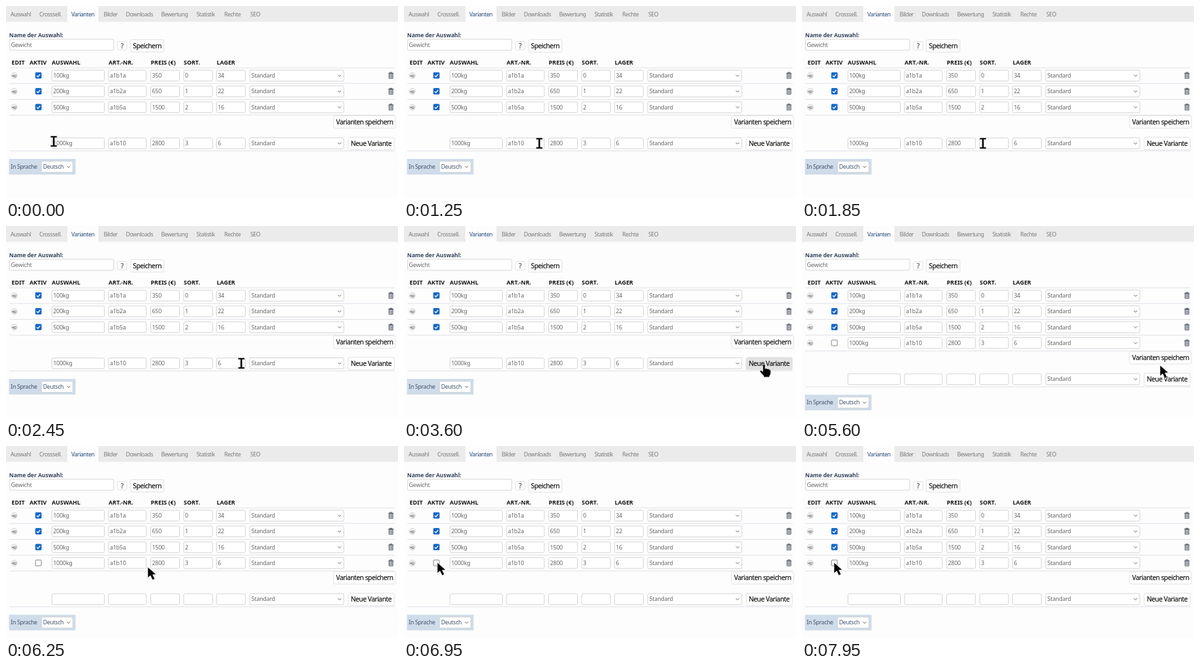
An HTML page that plays this animation: 600x295 px, repeating every 8 s.

```html
<!DOCTYPE html>
<html lang="de">
<head>
<meta charset="utf-8">
<title>Varianten</title>
<style>
  html, body { margin: 0; width: 100%; height: 100%; overflow: hidden; background: #fdfdfe; }
  svg { display: block; width: 600px; height: 295px; font-family: "Noto Sans", "Open Sans", sans-serif; }
  text { white-space: pre; }
  .tab { font-size: 8.7px; letter-spacing: -.45px; fill: #7b7b7b; }
  .on { fill: #244a78; }
  .val { font-size: 8.9px; letter-spacing: -.2px; fill: #666; }
  .head { font-size: 8.9px; font-weight: 700; fill: #161616; }
  .name { font-size: 8.6px; font-weight: 700; letter-spacing: -.05px; fill: #35435a; }
  .help { font-size: 10px; fill: #555; stroke: #555; stroke-width: .25; }
  .lang { font-size: 8.7px; letter-spacing: -.3px; fill: #42536a; }
  .btn { font-size: 10.2px; letter-spacing: -.44px; fill: #111; stroke: #111; stroke-width: .15; }
  .box { fill: #fff; stroke: #d0d0d0; stroke-width: .9; }
  .face { fill: #fff; stroke: #dedede; stroke-width: .9; }
  .hover { fill: #e1e1e1; }
</style>
</head>
<body>
<svg id="stage" viewBox="0 0 600 295"></svg>
<script>
const LOOP = 8000, ADDED = 3950, PITCH = 24.3;
const stage = document.getElementById('stage');

function el(parent, tag, attrs = {}, content) {
  const node = document.createElementNS('http://www.w3.org/2000/svg', tag);
  for (const key in attrs) node.setAttribute(key, attrs[key]);
  if (content) node.textContent = content;
  parent.append(node);
  return node;
}
const group = parent => el(parent, 'g');
const rect = (p, x, y, width, height, attrs) => el(p, 'rect', { x, y, width, height, ...attrs });
const label = (p, x, y, str, cls) => el(p, 'text', { x, y, class: cls }, str);
const path = (p, d, attrs) => el(p, 'path', { d, fill: 'none', ...attrs });
const rule = (p, y) => rect(p, 5, y, 590, 1, { fill: '#e0e2e7' });

function field(p, x, mid, w, str, h = 16.5) {
  rect(p, x, mid - h / 2, w, h, { rx: 2, class: 'box' });
  return label(p, x + 1.9, mid + 3.1, str, 'val');
}
function select(p, x, mid, w, str, cls = 'val') {
  rect(p, x, mid - 8.5, w, 17, { rx: 2, class: 'box' });
  label(p, x + 2.5, mid + 3.1, str, cls);
  path(p, `M${x + w - 9} ${mid - 1.2}l2.5 2.5 2.5-2.5`, { stroke: '#666', 'stroke-width': 1 });
}
function button(p, x, mid, w, str) {
  const face = rect(p, x, mid - 9.5, w, 19, { rx: 2.5, class: 'face' });
  label(p, x + 4, mid + 3.7, str, 'btn');
  return face;
}

const columns = [[70.3, 80.2], [157, 57.6], [221.5, 44], [272, 44], [322.3, 44]];
const items = [
  ['100kg', 'a1b1a', '350', '0', '34'],
  ['200kg', 'a1b2a', '650', '1', '22'],
  ['500kg', 'a1b5a', '1500', '2', '16'],
  ['1000kg', 'a1b10', '2800', '3', '6']
];
const inputs = (p, mid, values) => {
  const texts = columns.map(([x, w], i) => field(p, x, mid, w, values[i]));
  select(p, 373, mid, 144, 'Standard');
  return texts;
};
const rowMid = i => 106.9 + i * PITCH;

function editIcon(p, y) {
  el(p, 'circle', { cx: 12.7, cy: y, r: 4.6, fill: '#f0f0f0', stroke: '#cfcfcf', 'stroke-width': .8 });
  path(p, `M8.2 ${y + .8}q4-3.6 8-1.6l-1 3.4q-3 1-4-.9z`, { fill: '#9a9a9a' });
  el(p, 'circle', { cx: 13.8, cy: y + .4, r: .9, fill: '#f3f3f3' });
}
function checkbox(p, y, on) {
  rect(p, 45.2, y - 4.6, 8.8, 8.8, {
    rx: 1, fill: on ? '#1264c8' : '#fff', stroke: on ? '#1264c8' : '#777', 'stroke-width': .9
  });
  if (on) path(p, `M47 ${y}l1.9 2 3.4-4.2`, { stroke: '#fff', 'stroke-width': 1.3 });
}
function trash(p, y) {
  path(p, `M585.2 ${y - 3.6}h8M587.6 ${y - 3.8}v-1.1h3.2v1.1`, { stroke: '#4d5560', 'stroke-width': 1 });
  path(p, `M586.2 ${y - 2.8}h6v7.2h-6z`, { stroke: '#4d5560', 'stroke-width': .9, fill: '#d3d6da' });
  path(p, `M588 ${y - 1.5}v4.6M590.3 ${y - 1.5}v4.6`, { stroke: '#4d5560', 'stroke-width': .8 });
}
function row(p, i) {
  const y = rowMid(i);
  editIcon(p, y);
  checkbox(p, y, i < 3);
  inputs(p, y, items[i]);
  trash(p, y);
  rule(p, y + 11.7);
}

// Tabs
rect(stage, 0, 0, 600, 24.4, { fill: '#ebebec' });
rect(stage, 94, 0, 47.5, 25, { fill: '#fdfdfe' });
[['Auswahl', 7], ['Crosssell.', 51], ['Varianten', 100], ['Bilder', 149.5], ['Downloads', 183.5],
 ['Bewertung', 237.5], ['Statistik', 291.5], ['Rechte', 334], ['SEO', 374]]
  .forEach(([str, x], i) => label(stage, x, 16, str, i === 2 ? 'tab on' : 'tab'));

// Name
label(stage, 4.8, 48.2, 'Name der Auswahl:', 'name');
field(stage, 5.6, 59.5, 159.4, 'Gewicht', 17);
rect(stage, 170.5, 54.5, 14.5, 13, { rx: 2, class: 'face' });
el(stage, 'text', { x: 177.8, y: 64.8, 'text-anchor': 'middle', class: 'help' }, '?');
button(stage, 190.3, 61.3, 51.5, 'Speichern');

// Table
[['EDIT', 8.5], ['AKTIV', 36], ['AUSWAHL', 70], ['ART.-NR.', 157], ['PREIS (€)', 221.5],
 ['SORT.', 272], ['LAGER', 322.5]].forEach(([str, x]) => label(stage, x, 90.1, str, 'head'));
rule(stage, 94.5);
for (let i = 0; i < 3; i++) row(stage, i);
const added = group(stage);
row(added, 3);

// Everything below the table slides down when a row is added
const tail = group(stage);
button(tail, 501.2, 178.2, 95, 'Varianten speichern');
const draft = inputs(tail, 211, items[3]);
const create = button(tail, 523.7, 211.4, 70.5, 'Neue Variante');
rule(tail, 222.2);
rect(tail, 4.5, 235, 102, 24, { fill: '#cfdce9' });
label(tail, 7.3, 250, 'In Sprache', 'lang');
select(tail, 54.3, 247, 48, 'Deutsch', 'lang');

// Pointers, with the hot spot at 0,0
const ink = { fill: '#050505', stroke: '#fff', 'stroke-width': .6, 'stroke-linejoin': 'round' };
const pointers = {
  beam: path(stage, 'M-5-8.5H5V-5.8H1.6V5.8H5V8.5H-5V5.8H-1.6V-5.8H-5z', ink),
  arrow: path(stage, 'M0 0V16.6L4 13.1 7.3 19.8 10.8 18.2 7.6 11.8 12.9 11.4z', ink),
  hand: path(stage, 'M-1.8 1.2Q0-1 1.8 1.2V7Q4 5.8 5 7.5 7 6.6 7.8 8.4 10 7.8 10.3 10V14Q10 16.5 8.5 18V20H-.5V18.2L-6 11.8Q-6.6 9.4-4.4 9.6L-1.8 11.6z', ink)
};

// time, x, y
const track = [
  [0, 73, 208], [1250, 207, 211], [1700, 256, 211], [2450, 360, 211], [2550, 379, 211],
  [3000, 478, 212], [3350, 551, 212], [5150, 551, 213], [5450, 548, 214], [5640, 548, 214],
  [6000, 350, 196], [6400, 138, 180], [6700, 66, 179], [6950, 51, 179], [7300, 51, 179],
  [7600, 49, 179], [8000, 49, 179]
];
function place(t) {
  const i = track.findIndex(k => k[0] > t);
  const [a, b] = [track[i - 1], track[i]];
  const f = (t - a[0]) / (b[0] - a[0]);
  return [a[1] + (b[1] - a[1]) * f, a[2] + (b[2] - a[2]) * f];
}

function draw(t) {
  const done = t >= ADDED;
  const shift = done ? PITCH : 0;
  added.setAttribute('visibility', done ? 'visible' : 'hidden');
  tail.setAttribute('transform', `translate(0 ${shift})`);
  draft.forEach(d => d.setAttribute('visibility', done ? 'hidden' : 'visible'));

  const [x, y] = place(t);
  const mids = done ? [rowMid(3), 211 + shift] : [211];
  const inField = mids.some(m => Math.abs(y - m) < 8.3) && columns.some(([l, w]) => x > l && x < l + w);
  const onCreate = x > 523.7 && Math.abs(y - 211.4 - shift) < 9.5;
  create.setAttribute('class', onCreate ? 'face hover' : 'face');
  const kind = onCreate ? 'hand' : inField ? 'beam' : 'arrow';
  for (const name in pointers) {
    pointers[name].setAttribute('visibility', name === kind ? 'visible' : 'hidden');
    pointers[name].setAttribute('transform', `translate(${x} ${y})`);
  }
}

const start = performance.now();
function tick() {
  draw((performance.now() - start) % LOOP);
  requestAnimationFrame(tick);
}
tick();
</script>
</body>
</html>
```
